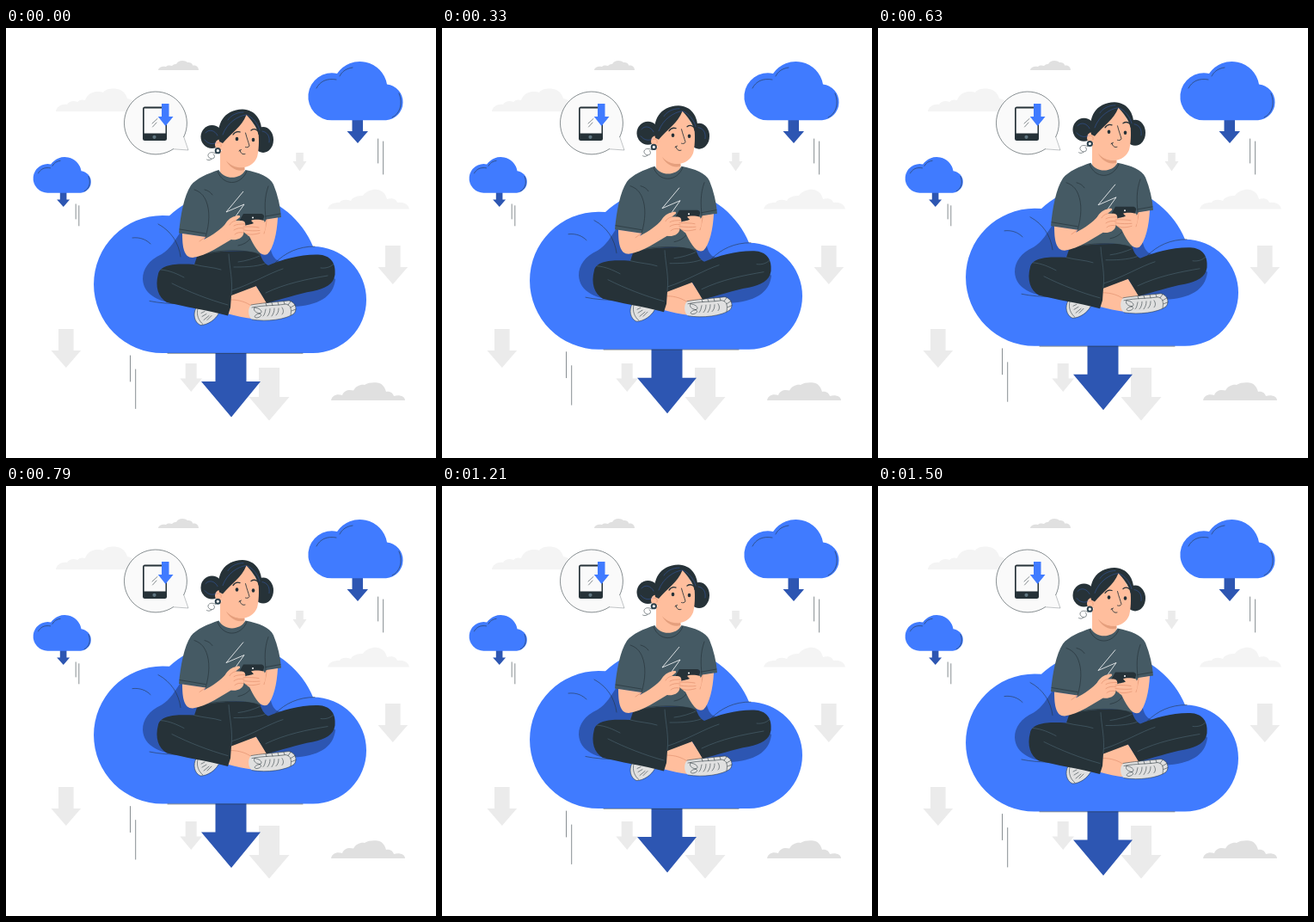
These frames come from a looping animation (500x500 px, 1.54 s). An HTML page:

```html
<!DOCTYPE html>
<html lang="en">
<head>
<meta charset="utf-8">
<title>Cloud download</title>
<style>
  html, body { margin: 0; width: 100%; height: 100%; overflow: hidden; background: #fff; }
  svg { display: block; width: 100vw; height: 100vh; }
  .line { fill: none; stroke: #263238; stroke-width: .55; stroke-linecap: round; stroke-linejoin: round; }
  .line * { vector-effect: non-scaling-stroke; }
  .seam { fill: none; stroke: #263238; stroke-width: .65; stroke-linecap: round; }
  .fold { fill: none; stroke: #55717f; stroke-width: .5; stroke-linecap: round; }
  .strand { fill: none; stroke: #407bff; stroke-width: .5; stroke-opacity: .6; stroke-linecap: round; }
  .blue { fill: #407bff; }
  .deep { fill: #2d56b2; }
  .dark { fill: #263238; }
  .skin { fill: #ffbe9d; }
  .tan { fill: none; stroke: #e08f6d; stroke-width: .65; stroke-linecap: round; stroke-linejoin: round; }
  .shirt { fill: #455a64; }
  .shoe { fill: #e0e0e0; }
  .pale { fill: #ebebeb; }
</style>
</head>
<body>
<svg viewBox="0 0 500 500" xmlns="http://www.w3.org/2000/svg">
  <defs>
    <g id="cloud">
      <path class="deep" d="M402.500 106H415V120H421L409 134L396.500 120H402.500Z"/>
      <path class="blue" d="M379.500 107.300A27.500 27.500 0 1 1 385 53A32 32 0 0 1 443 65.500A21 21 0 0 1 442 107.300Z"/>
      <g class="line">
        <path d="M361 70C365 62 373 58 384 60M388 56C391 50 396 47 403 46M457 76C462 88 458 100 449 104"/>
        <path d="M432.600 129V157M438.600 132V170"/>
      </g>
    </g>
  </defs>

  <!-- backdrop -->
  <path fill="#e0e0e0" d="M177 49C178 45 182 44.500 186 45C188 43 191 43.500 193 44C195 42 197 42 198 42C200 37 208 37 211 40C214 39.500 217 41 217 43.500C221 43 224 45 224 49Z"/>
  <path fill="#f4f4f4" d="M58 97C59 91 65 88 71 89C73 85 79 84 83 86C86 83 89 83 92 84C96 73 107 73 113 75C115 71 122 70 127 70.500C135 71 140 77 141 82C149 83 153 90 153 97Z"/>
  <path fill="#f4f4f4" d="M374 210.500C376 204 382 203 388 203C390 199 396 199 401 201C403 196 410 195 415 195C419 189 427 187 432 188C438 189 442 194 443 199C449 197 454 199 455 203C462 202 468 205 469 210.500Z"/>
  <path fill="#e0e0e0" d="M378 433C379 427 385 425 391 427C393 421 399 420 404 421.500C407 416 413 414 417 415C421 412 428 412 432 412.500C438 413 441 419 442 423C447 422 450 425 451 428C457 426 464 428 464 433Z"/>
  <g id="arrows"></g>

  <use href="#cloud"/>
  <use href="#cloud" transform="translate(32 150) scale(.61) translate(-352 -39)"/>

  <!-- bubble -->
  <path class="line" d="M206.700 126.500L212 142L194.500 140.800" style="fill:#fafafa" stroke-opacity=".5"/>
  <circle cx="174" cy="110.500" r="36.500" fill="#fafafa"/>
  <path class="line" d="M206.700 126.700A36.500 36.500 0 1 0 194.500 140.700"/>
  <rect class="dark" x="159" y="91.500" width="28" height="39.500" rx="2.500"/>
  <rect x="160.700" y="93.500" width="24.800" height="29" fill="#fafafa"/>
  <circle cx="172.500" cy="126.800" r="2.100" fill="#607681"/>
  <path class="line" d="M170 111L176 105.500M170.500 115L175 110"/>
  <path class="blue" d="M181 88H189.500V103H194.500L185.500 114L176.800 103H181Z"/>

  <g id="ride">
    <!-- cloud seat -->
    <path class="deep" d="M243.500 376H279.500V411H296L262 452.500L227 411H243.500Z"/>
    <path class="blue" d="M182 378A80 80 0 0 1 182 218L190 218.200A104 104 0 0 1 357 254A62 62 0 0 1 357 378Z"/>
    <path class="deep" d="M203 237C197 246 191 257 181 263C166 270 159 280 159 292C160 311 179 320 207 321L300 318L334 324C362 323 381 313 383 292L345 266L322 271C314 272 310 266 308 258L294 250Z"/>
    <path class="line" d="M188 378.300H345M147 244C156 243 163 246 168 251M177 228C192 236 201 250 203 266M167 317.500Q184 321 204 320.500M313 273C325 261 340 254 359 254"/>
    <path class="line" d="M144.500 381V411M150.700 397V442.500"/>

    <!-- shoes and ankles -->
    <g transform="translate(-1 -1.500)">
      <path class="shoe" d="M222 327L249 332C245 340 236 347 227 347C220 344 218 334 222 327Z"/>
      <path class="line" d="M222 327C218 334 220 344 227 347C236 347 245 340 248 334M224 328C222 335 225 342 230 346M228 333L232 331M229 337L234 334M231 341L237 336M235 341L240 336"/>
    </g>
    <path class="skin" d="M257 310L290 299L304 320L284 324L286 338C277 337 268 335 257 332Z"/>
    <path class="tan" d="M262 316C271 316 280 319 285 323"/>
    <path class="shoe" d="M285 322C296 320 310 319 329 317C337 319 339 327 335 332C326 339 303 342 286 339C281 335 281 326 285 322Z"/>
    <path class="line" d="M285 322C296 320 310 319 329 317C337 319 339 327 335 332C326 339 303 342 286 339M286 325C300 322 315 323 325 321C332 322 332 328 331 334M302 320L303 323M309 319.500L310 322.500M316 318.500L317 322M323 318L324 321M331 318L328 322M336 322L331 325M337 327L332 329"/>
    <path class="line" d="M289 325C297 326 299 331 295 332C290 331 287 328 289 325M295 332C289 333 287 337 292 337C297 336 298 333 295 332M302 327C301 331 301 333 299 335M307 326.500C307 330 306 333 304 335M312 326C312 330 311 332 309 335M317 326C317 330 316 332 314 334M321 325C323 328 323 331 321 333"/>

    <!-- trousers -->
    <path class="dark" d="M224 260L294 259C297 268 300 274 305 276C322 269 342 263 363 263.500C377 264 384 273 382.500 287C381 298 371 303 357 306C338 309 320 316 303 320L291 300L262 311L261 325L258 334.500C234 328 206 324 187 319C177 313 173 301 177 286C180 274 200 274 219 275Z"/>
    <path class="fold" d="M259 263C260 280 264 293 262 310M263 305C285 298 306 285 322 280M265 278C275 278 290 278 301 274M270 272C279 271 288 268 295 265M193 297C213 307 236 316 258 322M219 275C230 278 241 278 250 281M302 308C325 297 350 292 374 288M366 279C373 280 379 277 381 274M180 281C191 282 199 286 207 290"/>

    <!-- neck -->
    <path class="skin" d="M249 142V176H278L277 157Z"/>
    <path fill="#e59f7d" d="M256 154C262 161 269 163 277.300 162L277.500 165C268 168 259 161 256 154Z"/>

    <!-- shirt -->
    <path class="shirt" d="M247.500 165C253 176.500 272 177 278.500 165C294 168 307 173 311 182C316 194 319 207 320 220L303 223C300 235 298 248 295 264C288 258 252 256 220 266C226 257 231 250 232 243L201 238.500C203 217 207 195 215 183C221 175 235 169 247.500 165Z"/>
    <path class="seam" d="M246 166.500C252 184 273 184 280 166.500M202 234L232 239M302 219L319 216M232 243C237 227 237 212 233 202C230 194 225 190 219 188M302 222C301 209 300 198 305 184M219 266C242 257 277 257 295 263M270 253C276 252 281 249 284 245M240 194C238 191 235 189 231 188"/>
    <path d="M276 190L256 214L277 205L267 219" fill="none" stroke="#fff" stroke-width=".8"/>

    <!-- arms, phone, hands -->
    <path class="skin" d="M205 239L232 243L230 246C240 241 250 234 256 227L267 243C251 252 233 265 217 267C207 267 205 255 205 239Z"/>
    <path class="skin" d="M303 222.500L316 220.500C315 239 311 256 304 263C296 267 289 255 282 240L299 229Z"/>
    <path class="tan" d="M300 239C301 234 303 228 303 223M232 243L225 248"/>
    <path class="dark" d="M276 216H296C299 216 300.500 218 300 220L298 226C297 228 295 229 292 229H276C272 229 271 226 272 223Z"/>
    <circle cx="287" cy="220.500" r="1" fill="#fff"/>
    <path class="skin" d="M254 230C256 225 261 220 266 219C269 218 273 217 272 220L267 224C271 224 278 223 278 227C279 232 277 235 276 240C274 245 268 247 262 246C257 244 253 236 254 230Z"/>
    <path class="skin" d="M276 231C280 228 285 229 288 227L285 224C289 222 296 223 300 224C303 230 302 236 298 240C292 245 283 244 280 240C276 238 274 233 276 231Z"/>
    <path class="tan" d="M267 224C263 225 261 227 260 229M278 228C273 228 268 228 265 230M277 233C272 232 268 233 265 235M276 238C272 237 268 238 266 240M276 231C283 231 289 231 294 232M276 235C284 236 290 236 295 235.500M279 239C284 241 290 240 295 238.500"/>

    <!-- head -->
    <ellipse class="dark" cx="239.500" cy="126.500" rx="13" ry="13.500"/>
    <ellipse class="dark" cx="299" cy="130" rx="12" ry="15"/>
    <path class="skin" d="M251 130C258 122 268 112 279 98C286 108 291 116 293.500 122C294.500 131 294 143 292 150C289 158 281 163 272 162C261 160 254 155 251 144Z"/>
    <ellipse class="skin" cx="248.500" cy="136" rx="5.500" ry="6.500"/>
    <path class="tan" d="M245.500 134C248 132 251 134 250 138"/>
    <path class="dark" d="M248 132C244 112 253 95 275 94.500C290 95 298 107 297.500 123L293.500 124C292 115 285 107 279.500 101C274 115 262 122 252 134Z"/>
    <path class="strand" d="M279 101C270 102 257 110 252 124M280 101C287 104 293 111 295 119M232 122C236 117 243 119 246 125M231 130C235 135 241 136 245 133M298 120C304 121 307 126 306 133M276 98C268 98 261 102 258 107"/>
    <ellipse class="dark" cx="268.500" cy="129" rx="1.800" ry="2.300"/>
    <ellipse class="dark" cx="287.500" cy="130" rx="1.800" ry="2.300"/>
    <path class="line" style="stroke-width:1.300" d="M264 124C266 121 269 120 272 121M285 119C287 117.500 290 117.500 292 119"/>
    <path class="line" style="stroke-width:.85" d="M278.500 122C280 128 282 133 283 137C282 139 280 139 278.500 138.500M272 142C272.500 145.500 275 147.500 278 146.500M271 143L273.500 141.500"/>
    <circle cx="246.300" cy="142.700" r="2.600" fill="#fff" stroke="#2c414d" stroke-width="2"/>
    <path class="line" d="M244 146C241 144 236 144 235 147.500C234.500 151 239 153.500 242 151C243 149 242 147 241 146.500M239 152.500C237 154 235 154 233.500 153"/>
  </g>
</svg>
<script>
  const LOOP = 1540, RISE = 10, LEAD = 50;
  const ride = document.getElementById('ride');

  // centre, top, neck, tip, half shaft, half head
  const arrows = [
    [341.5, 145, 155, 166.5, 4.3, 8],
    [449.8, 253, 278, 298, 8.8, 17.3],
    [69.8, 350, 375, 395, 8.8, 17.3],
    [215.2, 390, 407.5, 423, 6.5, 12.8],
    [306, 395, 429, 456.5, 12, 23.5]
  ];
  const arrow = ([x, top, neck, tip, s, h]) =>
    `<path class="pale" d="M${x - s} ${top}H${x + s}V${neck}H${x + h}L${x} ${tip}L${x - h} ${neck}H${x - s}Z"/>`;
  document.getElementById('arrows').innerHTML = arrows.map(arrow).join('');

  // linear up and down
  const lift = t => {
    const p = ((t + LEAD) % LOOP) / LOOP;
    return RISE * (1 - Math.abs(1 - 2 * p));
  };

  const start = performance.now();
  function draw(t) {
    ride.setAttribute('transform', `translate(0 ${(lift(0) - lift(t)).toFixed(3)})`);
  }
  function tick(now) {
    draw(Math.max(0, now - start));
    requestAnimationFrame(tick);
  }
  draw(0);
  requestAnimationFrame(tick);
</script>
</body>
</html>
```
